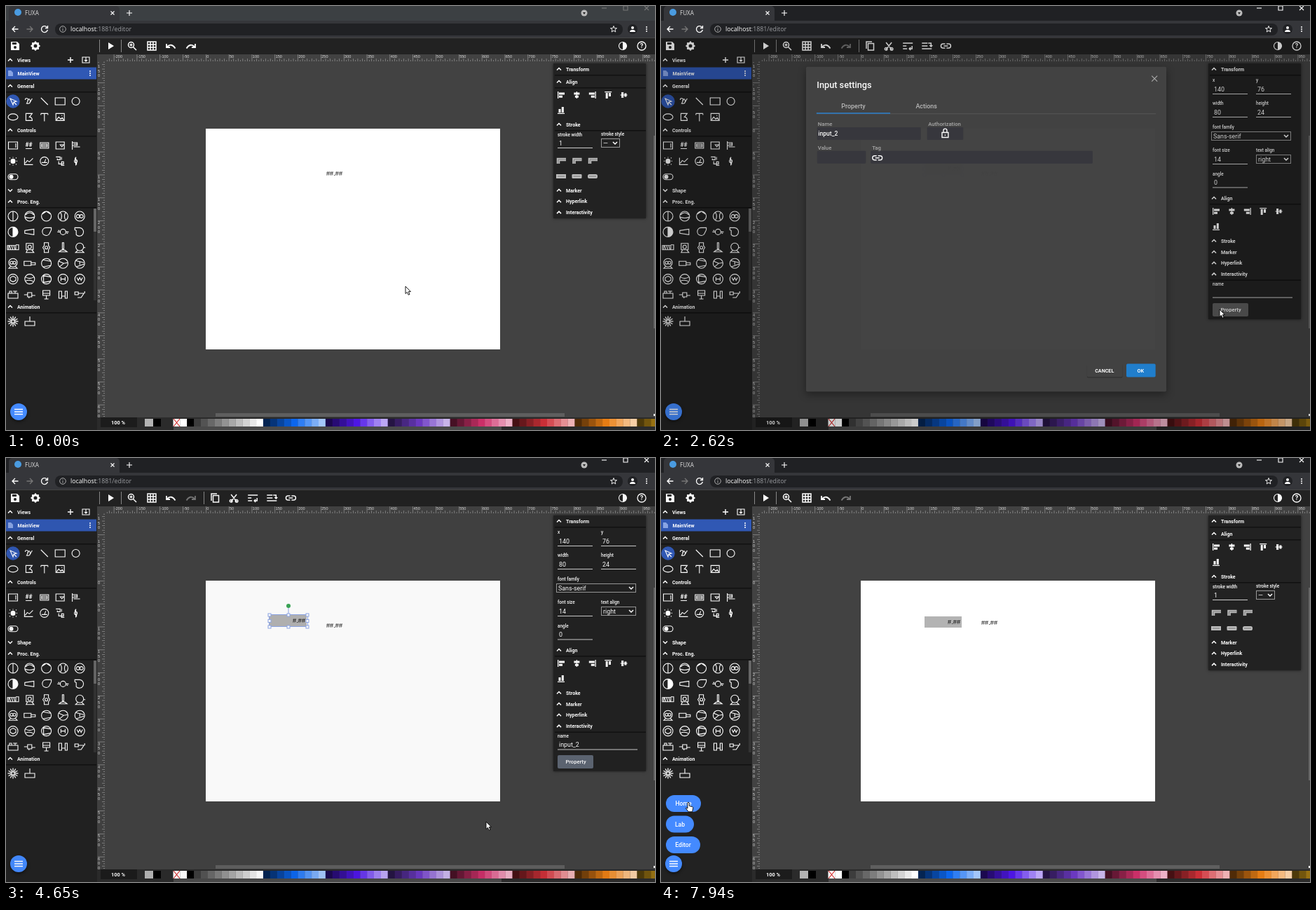
These frames come from a looping animation (926x605 px, 8000 ms). An HTML page with a canvas:

```html
<!DOCTYPE html>
<html lang="en">
<head>
<meta charset="utf-8">
<title>Editor</title>
<style>
  html, body { margin: 0; height: 100%; overflow: hidden; background: #424242; }
  canvas { display: block; }
</style>
</head>
<body>
<canvas id="stage" width="926" height="605"></canvas>
<script>
const ctx = document.getElementById('stage').getContext('2d');
const LOOP = 8000, UNIT = 0.6563, PAGE = { x: 285, y: 175, w: 420, h: 315 };
const BLUE = '#448aff', ROW_BLUE = '#3058b4', DARK = '#222', GRAY = '#777';

const clamp = v => Math.max(0, Math.min(1, v));
const smooth = v => v * v * (3 - 2 * v);
const easeOut = v => 1 - (1 - clamp(v)) ** 3;
const circle = (r, x = 0, y = 0) => `M${x - r} ${y}a${r} ${r} 0 1 0 ${2 * r} 0a${r} ${r} 0 1 0 ${-2 * r} 0`;

function rect(x, y, w, h, fill, r = 0) {
  ctx.fillStyle = fill;
  ctx.beginPath();
  ctx.roundRect(x, y, w, h, r);
  ctx.fill();
}
function frame(x, y, w, h, color) {
  ctx.strokeStyle = color;
  ctx.lineWidth = 1;
  ctx.strokeRect(x + .5, y + .5, w - 1, h - 1);
}
function text(s, x, y, size = 7.05, { color = '#fff', weight = 400, align = 'left', font = 'Roboto' } = {}) {
  ctx.font = `${weight} ${size}px "${font}", sans-serif`;
  ctx.fillStyle = color;
  ctx.textAlign = align;
  ctx.fillText(s, x, y + size * .36);
}
function icon(d, x, y, { color = '#fff', fill, width = 1.1 } = {}) {
  const path = new Path2D(d);
  ctx.save();
  ctx.translate(x, y);
  if (fill) { ctx.fillStyle = fill; ctx.fill(path); }
  if (width) { ctx.strokeStyle = color; ctx.lineWidth = width; ctx.stroke(path); }
  ctx.restore();
}
const solid = (d, x, y, color = '#fff') => icon(d, x, y, { fill: color, width: 0 });
const dots = (x, y, gap = 3) => [-gap, 0, gap].forEach(d => solid(circle(1), x, y + d));

const SHAPES = {
  cut: 'M-4-5L4 5M4-5L-4 5' + circle(1.8, -4, 4.2) + circle(1.8, 4, 4.2),
  copy: 'M-5 4V-6H3M-2.5-3.5H5.5V6H-2.5Z',
  link: 'M-1-3H-4a3 3 0 0 0 0 6H-1M1-3H4a3 3 0 0 1 0 6H1M-3 0H3',
  undo: 'M-6-3V2H-1M-5.5 1.5Q1-5 6.5 3.5',
  redo: 'M6-3V2H1M5.5 1.5Q-1-5-6.5 3.5',
  grid: 'M-6-6H6V6H-6ZM-2-6V6M2-6V6M-6-2H6M-6 2H6',
  x: 'M-4-4L4 4M4-4L-4 4',
  plus: 'M-4 0H4M0-4V4',
  arrow: 'M0 0V10.5L2.4 8.3L4.2 12.2L6 11.4L4.3 7.6H7.4Z',
  hand: 'M-1.2 1.2q1.2-2 2.4 0v4.2l4.5 1.2q1.4.6 1 2.2l-1 5h-5.6l-3.8-5.2q.6-1.2 2.7.4z',
};
const ALIGN = ['M-5-5h1.3V5h-1.3ZM-3-3.5H5v3H-3ZM-3 .8H2v3H-3Z', 'M-.6-5H.6V5H-.6ZM-4-3.5H4v3H-4ZM-2.5.8h5v3h-5Z',
  'M3.7-5H5V5H3.7ZM-5-3.5H3v3H-5ZM-2 .8H3v3H-2Z', 'M-5-5H5v1.3H-5ZM-3.5-3h3v8h-3ZM.8-3h3v5h-3Z',
  'M-5-.6H5V.6H-5ZM-3.5-4h3v8h-3ZM.8-2.5h3v5h-3Z', 'M-5 3.7H5V5H-5ZM-3.5-2h3v5h-3ZM.8-5h3v8h-3Z'];
const TEXT_ALIGN = ['M-6-5H6M-6-2H2M-6 1H6M-6 4H2', 'M-6-5H6M-4-2H4M-6 1H6M-4 4H4', 'M-6-5H6M-2-2H6M-6 1H6M-2 4H6',
  'M-5-5H5M0 6V-3M-3 0L0-3L3 0', 'M-6 0H6M0-6V-2M-2-4L0-2L2-4M0 6V2M-2 4L0 2L2 4', 'M-5 5H5M0-6V3M-3 0L0 3L3 0'];
const GENERAL = ['M-4-4L0 5L1 1L5 0ZM1 1L5 5', 'M-5-2Q-5-5-2-4T-3 3Q3 4 2-1T-2 0M1 3L5-4',
  'M-5-5L5 5', 'M-7-5H7V5H-7Z', circle(5.5), 'M-7 0a7 4.5 0 1 0 14 0a7 4.5 0 1 0-14 0',
  'M-4-5H5L1 0Q5 0 5 5H-4Z', 'M-5-5H5M0-5V6M-5-5V-3M5-5V-3', 'M-6-5H6V5H-6ZM-5 4L-2 0L1 3L3 1L5 4M2-2h1'];
const CONTROLS = ['M-6.5-5H6.5V5H-6.5ZM4-3V3', '', 'M-6-4H6V4H-6ZM-4-2H4V2H-4ZM-4 0H4',
  'M-6-5H6V5H-6ZM0-1L2.5 2L5-1Z', 'M-5-6V6M-5-4H2V0H-5M-3 2H6M-3-2H2', circle(3) + 'M0-5V-6M0 5V6M-5 0H-6M5 0H6M-4-4l-1-1M4-4l1-1M-4 4l-1 1M4 4l1 1',
  'M-6-5V5H6M-5 3L-2-1L1 1L6-4', circle(6) + 'M-4 2H4M0 2L2-3', 'M-6-6H0V-2H-4V-4M-2 0V4H5V1H2V6H6M2-6V-2',
  'M0-6V6' + circle(2) + 'M-1-5V-2M1 2V5', 'M-3-4H3a4 4 0 0 1 0 8H-3a4 4 0 0 1 0-8'];
const RING = circle(7);
const PROCESS = [
  RING + 'M0-7V7', RING + 'M-6-2Q0-8 6-2M-7 1Q0 4 7 1', RING + 'M-6-3L0-7L6-3', RING + 'M-4-6Q0 0-4 6M4-6Q0 0 4 6', RING + circle(2.4, -2.5) + circle(2.4, 2.5),
  RING + 'M0-7V7', 'M-7-2L6-4V4L-7 2Z', 'M7-6H0A5.5 5.5 0 1 0 5 1L7-3Z', circle(4) + 'M-8 0H-4M4 0H8M-5-2H-7M5 2H7', 'M-7-6H0A6 6 0 1 1-5 4L-5-2L-7-3Z',
  'M-8-3H4V3H-8ZM-6 3V-3M-3 3L-5-3M0 3L-2-3M3 3L1-3M4-4H8V3H4', 'M-5-6H5V3H-5ZM-3 3L-5 7H6L3 3' + circle(2.5, 0, -1), 'M-3-7H3V-3L5 0L3 3V7H-3V3L-5 0L-3-3Z' + circle(2), 'M-1-7H1V2H-1ZM-6 6Q0 0 6 6Z', circle(5.5, 0, -1) + 'M-3 4L-6 7H6L3 4M5 0H8',
  circle(6, 0, -1) + circle(2, -2, -1) + circle(2, 2, -1) + 'M-3 4L-6 7H6L3 4', 'M-8-3H2V3H-8ZM2-1H8V2H2', RING + 'M-5-5L6-3M-5 5L6 3', RING + 'M-6-3L1 0L7-1M1 0L-5 5', RING + 'M-6-4L6-1M6 1L-5 5M0-2V2',
  RING + 'M0-4L4-2V2L0 4L-4 2V-2Z', RING + 'M-6-3Q0 1 6-3M-6 3Q0 0 6 4', RING + 'M-4-5V5M-5-5L6-3M-5 5L6 3', RING + 'M-3-3V3M3-3V3M-3 0H3', RING + 'M-4-2L-2 2L0-2L2 2L4-2',
  'M-7-2H7V5H-7ZM-5-2V-5H-2V-2M0-5H6M3-5V-2', 'M-8 0H-3M-3-3H3V3H-3ZM3 1H8M-1 3V5', 'M-5-6H5V1H-5ZM-5-2H5M0 1V6M-3 6H3', 'M-6-5V5H-2V-5ZM3-5V5H6V-5ZM-2 2H3', 'M-7-4H-2V0H-7ZM-2-2H6L2 4H-3M7-5V-2'];

function chevron(x, y, up, color) {
  icon(up ? 'M-3 1.5L0-1.5L3 1.5' : 'M-3-1.5L0 1.5L3-1.5', x, y, { color, width: 1.5 });
}
function header(label, x, y, w, open = true, line = true) {
  chevron(x, y, open);
  text(label, x + 10, y, 7.05, { weight: 700 });
  if (line) rect(x - 6, y + 8, w, 1.5, '#111');
}

function drawBrowser(focused) {
  const faint = focused ? '#fff' : '#777';
  rect(0, 0, 926, 24, focused ? '#202124' : '#3c4043');
  rect(4, 0, 158, 26, '#35363a', 5);
  rect(0, 21, 926, 24, '#35363a');
  rect(70, 25, 810, 17, '#202124', 8);
  solid(circle(5), 17, 9, '#4a9be0');
  text('FUXA', 27, 10, 8.1, { color: '#ddd', font: 'Open Sans' });
  icon('M-2.5-2.5L2.5 2.5M2.5-2.5L-2.5 2.5', 152, 10);
  icon(SHAPES.plus, 176, 10);
  solid(circle(4.5), 825, 10, '#bbb');
  solid('M-2-1H2L0 2Z', 825, 10, '#222');
  icon('M-3 0H4', 853, 3, { color: faint });
  icon('M-3-3H3V3H-3Z', 884, 3, { color: faint });
  icon('M-3-3L3 3M3-3L-3 3', 914, 3, { color: faint });
  icon('M4.5 0H-4M0-4L-4 0L0 4', 13, 33, { width: 1.3 });
  icon('M-4.5 0H4M0-4L4 0L0 4', 34, 33, { color: GRAY, width: 1.3 });
  icon('M4-2A4.5 4.5 0 1 0 4.4 1M4.5-5V-1.5H1', 55, 33, { width: 1.3 });
  icon(circle(4.3) + 'M0-.5V2.5M0-2.5V-1.5', 81, 33, { color: '#bbb', width: .9 });
  text('localhost', 92, 33, 8.8, { font: 'Open Sans' });
  const w = ctx.measureText('localhost').width;
  text(':1881/editor', 92 + w, 33, 8.8, { font: 'Open Sans', color: '#9a9ca0' });
  icon('M0-4.5L1.2-1.3H4.5L2 .8L2.8 4L0 2.2L-2.8 4L-2 .8L-4.5-1.3H-1.2Z', 867, 33, { width: .9 });
  solid(circle(7), 894, 33, '#202124');
  solid(circle(2, 0, -2) + 'M-4 4Q-4 1 0 1T4 4Z', 894, 33);
  dots(914, 33);
}

function drawToolbar(mode, redoOn) {
  rect(0, 45, 926, 24, DARK);
  rect(0, 45, 926, 1, '#444');
  solid('M-6-6H3L6-3V6H-6Z', 13, 57);
  rect(9, 52, 6, 3, DARK);
  solid(circle(2), 13, 59, DARK);
  icon(circle(4), 42, 57, { width: 3 });
  for (let i = 0; i < 8; i++) {
    const a = i * Math.PI / 4;
    solid(circle(1.2), 42 + 5.5 * Math.cos(a), 57 + 5.5 * Math.sin(a));
  }
  rect(133, 48, 1, 18, '#888');
  rect(164, 48, 1, 18, '#888');
  solid('M-4-5L4 0L-4 5Z', 150, 57);
  icon(circle(4, -1.5, -1.5) + 'M1.5 1.5L6 6M-3.5-1.5H.5M-1.5-3.5V.5', 180, 57, { width: 1.5 });
  icon(SHAPES.grid, 208, 57, { width: 1.5 });
  icon(SHAPES.undo, 235, 57, { width: 1.8 });
  icon(SHAPES.redo, 264, 57, { width: 1.8, color: redoOn ? '#fff' : GRAY });
  if (mode !== 'none') {
    const tools = [SHAPES.copy, SHAPES.cut].concat(mode === 'single'
      ? ['M-7-4H7M-7 0H-2M-7 4H-1M6 0V4H2M4 2L2 4L4 6', 'M-7-4H1M-7 0H1M-7 4H7M2-4H6V1M4-1L6 1L8-1', SHAPES.link]
      : ['M-7-6H7V6H-7ZM-4-3H2V1H-4ZM-1-1H4V3H-1Z', ...TEXT_ALIGN]);
    rect(282, 48, 1, 18, '#888');
    tools.forEach((d, i) => icon(d, 298 + i * 27.1, 57, { width: 1.5 }));
  }
  icon(circle(5.5), 880, 57);
  solid('M0-5.5A5.5 5.5 0 0 1 0 5.5Z', 880, 57);
  icon(circle(6), 907, 57, { width: 1.3 });
  text('?', 907, 57, 9, { align: 'center', weight: 700 });
}

function drawRulers() {
  ctx.save();
  ctx.beginPath();
  ctx.rect(130, 69, 796, 518);
  ctx.clip();
  const label = { color: '#ddd', font: 'Liberation Sans' };
  for (let v = -220; v < 980; v += 5) {
    const x = PAGE.x + v * UNIT, y = PAGE.y + v * UNIT, major = v % 50 === 0;
    const len = major ? 10 : v % 10 ? 2 : 4;
    if (x > 141) rect(x, 79 - len, .7, len, '#999');
    if (y > 79) rect(141 - len, y, len, .7, '#999');
    if (!major) continue;
    if (x > 141) text(String(v), x + 1.2, 72.5, 5.5, label);
    [...String(v)].forEach((c, i) => y + i * 6.5 > 76 && text(c, 131, y + 3 + i * 6.5, 5.5, label));
  }
  ctx.restore();
}

function drawSidebar(tool) {
  rect(0, 69, 130, 536, DARK);
  header('Views', 6, 77, 129, true, false);
  icon(SHAPES.plus, 92, 77, { width: 1.4 });
  icon('M-5-4H5V4H-5ZM0-4V2M-2 0L0 2L2 0', 114, 77);
  rect(0, 87.5, 129, 17, ROW_BLUE);
  solid('M-3-4H1L4-1V4H-3Z', 6, 96, '#88a4e4');
  text('MainView', 16.5, 96.5, 7.05, { weight: 700 });
  dots(120, 96);
  header('General', 6, 114, 129);
  header('Controls', 6, 177, 129);
  header('Shape', 6, 263, 129, false, false);
  header('Proc. Eng.', 6, 279, 129);
  header('Animation', 6, 429, 129);
  solid(circle(9.7), 10, tool === 'input' ? 199 : 136, ROW_BLUE);
  const place = (list, y, dx) => list.forEach((d, i) => icon(d, 10 + i % 5 * dx, y + Math.floor(i / 5) * 22.4));
  place(GENERAL, 136, 22.4);
  place(CONTROLS, 199, 22.4);
  text('##', 32.5, 198, 8.5, { weight: 700, align: 'center' });
  rect(28, 203, 9, 1, '#fff');
  solid(circle(3), 10, 221.4);
  solid(circle(3), 7.5, 243.8);
  place(PROCESS, 300, 23.8);
  solid('M0-7A7 7 0 0 1 0 7Z', 10, 322.4);
  rect(125, 289, 4, 131, '#333');
  rect(125, 289, 4, 33, '#666');
  for (let i = 0; i < 12; i++) {
    const a = i * Math.PI / 6, c = Math.cos(a), s = Math.sin(a);
    icon(`M${1.5 * c} ${1.5 * s}L${7.5 * c} ${7.5 * s}`, 10, 450, { width: 1.3 });
  }
  icon('M-7 0H7V6H-7ZM0 0V-7', 34, 450);
}

function drawBottom() {
  rect(299, 581, 498, 5, '#5f5f5f');
  rect(924, 185, 2, 275, '#666');
  rect(924, 582, 2, 3, '#fff');
  rect(130, 587, 796, 18, '#2b2b2b');
  rect(135, 587, 52, 14, '#1c1c1c');
  text('100 %', 150, 594, 7.4, { weight: 700 });
  rect(198, 589, 12, 11, '#b3b3b3');
  rect(210, 589, 11, 11, '#000');
  const ramps = [[216, 90], [256, 82], [262, 54], [338, 62], [357, 62], [30, 84], [43, 80]];
  for (let i = 0; i < 70; i++) {
    const group = Math.floor((i - 13) / 9), step = (i - 13) % 9;
    const color = i < 2 ? '#fff' : i === 2 ? '#000'
      : i < 13 ? `hsl(0 0% ${24 + (i - 3) * 8.4}%)`
      : `hsl(${ramps[group][0]} ${ramps[group][1]}% ${17 + step * 8}%)`;
    rect(238.5 + i * 9.88, 589, 10, 11, color);
  }
  icon('M-4.5-5.5L4.5 5.5M4.5-5.5L-4.5 5.5', 243.5, 594.5, { color: '#d02020' });
  rect(239, 600, 468, 5, '#4a4a4a');
}

const caption = (s, x, y) => text(s, x, y, 6.4, { weight: 500 });
function field(label, value, x, y, w = 50) {
  caption(label, x, y);
  text(value, x + 2, y + 12.5, 8.9);
  rect(x, y + 19, w, 1, '#ccc');
}
function select(value, x, y, w) {
  frame(x, y, w, 13, '#999');
  text(value, x + 3, y + 6.5, 8.9);
  chevron(x + w - 7, y + 6.5, false);
}

function drawPanel(mode, name) {
  const single = mode === 'single', bottom = { none: 303, single: 447, multi: 225 }[mode];
  const row = (label, y, line) => header(label, 789, y, 130, true, line);
  ctx.save();
  ctx.shadowColor = 'rgba(0,0,0,.6)';
  ctx.shadowBlur = 4;
  rect(781, 82, 132, bottom - 82, DARK);
  ctx.restore();
  row('Transform', 90, true);
  if (single) {
    field('x', '140', 787, 106);
    field('y', '76', 849, 106);
    field('width', '80', 787, 139);
    field('height', '24', 849, 139);
    caption('font family', 787, 172.5);
    select('Sans-serif', 785, 179, 114);
    field('font size', '14', 787, 206);
    caption('text align', 849, 206);
    select('right', 849, 212, 50);
    field('angle', '0', 787, 239.5);
  }
  const y = single ? 274 : 108;
  row('Align', y, true);
  ALIGN.forEach((d, i) => solid(d, 792 + i % 5 * 22.4, y + 19 + Math.floor(i / 5) * 22));
  row('Stroke', y + 61, mode === 'none');
  if (mode === 'none') {
    caption('stroke width', 787, 183.5);
    text('1', 789, 196, 8.9);
    rect(787, 202, 50, 1, '#ccc');
    caption('stroke style', 849, 183);
    select('—', 849, 189, 27);
    for (let i = 0; i < 3; i++) {
      const x = 792 + i * 22.5;
      icon('M7-2H-4V4', x, 221, { color: '#bbb', width: 4.5 });
      icon('M7-2H-4V4', x, 221, { color: '#777', width: 1 });
      rect(x - 7, 240, 14, 6, '#bbb', i * 1.3);
      rect(x - 5, 242.5, 10, 1, '#777');
    }
  }
  const next = mode === 'none' ? 263 : y + 77;
  row('Marker', next, false);
  row('Hyperlink', next + 15.8, false);
  row('Interactivity', next + 31.6, single);
  if (single) {
    field('name', name, 787, 396.5, 114);
    rect(787, 424, 51, 19, name ? '#5d6573' : '#5b5b5b', 2);
    text('Property', 813, 433.5, 7.6, { weight: 500, align: 'center' });
  }
}

function drawPage(s) {
  rect(PAGE.x, PAGE.y, PAGE.w, PAGE.h, '#fff');
  const black = { color: '#000', font: 'Liberation Sans' }, edge = '#8fa8e8';
  const inputY = s.aligned ? 226 : 224, labelY = s.aligned ? 234.5 : 238.5;
  if (s.hasInput) {
    rect(376, inputY, 53, 16, '#b3b3b3');
    text('#.##', 427, inputY + 8, 9.2, { ...black, align: 'right' });
  }
  text('##.##', 457, labelY, 9.2, black);
  if (s.mode !== 'none') frame(375, inputY - 1, 56, 18, edge);
  if (s.mode === 'multi') frame(455, labelY - 6.5, 27, 13, edge);
  if (s.mode === 'single') {
    rect(402.5, 213, 1, 10, edge);
    solid(circle(3), 403, 211, '#3aa655');
    for (let i = 0; i < 9; i++) {
      if (i === 4) continue;
      const x = 376 + i % 3 * 27, y = 224 + Math.floor(i / 3) * 8.5;
      rect(x - 2, y - 2, 4, 4, '#fff');
      frame(x - 2.5, y - 2.5, 5, 5, edge);
    }
  }
  if (s.marquee) {
    const { x, y } = s.pointer;
    rect(x, y, 524 - x, 280 - y, 'rgba(80,120,255,.12)');
    frame(x, y, 524 - x, 280 - y, edge);
  }
}

function drawDialog(t) {
  const shown = easeOut((t - 2515) / 150), scale = .7 + .3 * shown;
  const label = { color: '#aaa', weight: 500 };
  // the surface starts lighter and settles with the backdrop
  const light = 26.5 - 4.2 * easeOut((t - 2620) / 300);
  const surface = `hsl(0 0% ${light}%)`, box = `hsl(240 5% ${light - 3.6}%)`;
  ctx.save();
  ctx.globalAlpha = shown * clamp((4640 - t) / 40);
  ctx.translate(464, 318.5);
  ctx.scale(scale, scale);
  ctx.translate(-464, -318.5);
  ctx.save();
  ctx.shadowColor = 'rgba(0,0,0,.4)';
  ctx.shadowBlur = 12;
  ctx.shadowOffsetY = 4;
  rect(205, 85, 518, 467, surface, 2);
  ctx.restore();
  text('Input settings', 220.5, 111, 12.8, { weight: 500 });
  icon(SHAPES.x, 706, 102, { color: '#aaa', width: 1.2 });
  text('Property', 273, 141, 9, { color: '#bbb', align: 'center', weight: 500 });
  text('Actions', 378, 141, 9, { color: '#bbb', align: 'center', weight: 500 });
  rect(220, 152, 488, 1, '#555');
  rect(220, 151, 106, 1.5, '#2a82d0');
  text('Name', 222, 167, 7.8, label);
  text('Authorization', 380.5, 167, 7.8, label);
  text('Value', 222, 201, 7.8, label);
  text('Tag', 300, 201, 7.8, label);
  rect(221, 172, 149, 18, box, 1);
  rect(379, 172, 52, 18, box, 1);
  rect(221, 206, 70, 18, box, 1);
  rect(298, 206, 319, 18, box, 1);
  text('input_2', 222.5, 181, 8.6, { weight: 500 });
  icon('M-4.5-1H4.5V6H-4.5ZM-2.5-1V-4a2.5 2.5 0 0 1 5 0V-1M0 2V3.5', 405, 180.5, { width: 1.4 });
  icon(SHAPES.link, 307.5, 216, { width: 1.4 });
  rect(609, 513, 51, 19, '#2c2c2c', 2);
  rect(609, 512, 51, 19, surface, 2);
  text('CANCEL', 634, 521.5, 7.2, { weight: 700, align: 'center' });
  rect(665.5, 512, 42, 19, '#1f7fcf', 2);
  text('OK', 686, 521.5, 7.2, { weight: 700, align: 'center' });
  ctx.restore();
}

function drawMenu(open) {
  if (open) {
    [['Home', 50, 481], ['Lab', 40, 510.5], ['Editor', 49, 540]].forEach(([s, w, y]) => {
      rect(7, y, w, 24, BLUE, 12);
      text(s, 7 + w / 2, y + 12, 8.6, { align: 'center', weight: 500 });
    });
  }
  ctx.save();
  ctx.shadowColor = 'rgba(0,0,0,.5)';
  ctx.shadowBlur = 4;
  ctx.shadowOffsetY = 2;
  solid(circle(12), 18, 579, BLUE);
  ctx.restore();
  icon('M-6-3.5H6M-6 0H6M-6 3.5H6', 18, 579, { width: 1.4 });
}

// time, x, y of the pointer
const TRACK = [
  [80, 570, 400], [430, 8, 195], [540, 8, 195], [870, 262, 300], [1500, 376, 240], [1830, 376, 240],
  [2450, 797, 433], [2680, 797, 433], [3400, 770, 300], [3700, 722, 150], [4020, 743, 179],
  [4270, 685, 489], [4440, 685, 519], [4660, 685, 519], [4900, 524, 280], [5320, 314, 203],
  [5620, 239, 71], [5760, 184, 58], [6220, 470, 62], [6300, 488, 58], [6680, 488, 58],
  [6940, 505, 278], [7200, 505, 278], [7540, 18, 577], [7660, 18, 577], [7880, 38, 503], [7940, 39, 491],
];
function pointerAt(t) {
  const i = TRACK.findIndex(k => k[0] > t);
  if (i < 1) { const [, x, y] = TRACK.at(i); return { x, y }; }
  const [t0, x0, y0] = TRACK[i - 1], [t1, x1, y1] = TRACK[i];
  const p = smooth((t - t0) / (t1 - t0));
  return { x: x0 + (x1 - x0) * p, y: y0 + (y1 - y0) * p };
}
const between = (t, a, b) => t >= a && t < b;

function stateAt(t) {
  return {
    pointer: pointerAt(t),
    hand: between(t, 3600, 4600) || t >= 7500,
    focused: t >= 450,
    tool: between(t, 450, 1850) ? 'input' : 'select',
    hasInput: t >= 1500,
    mode: between(t, 1850, 4900) ? 'single' : between(t, 5320, 7200) ? 'multi' : 'none',
    marquee: between(t, 4900, 5320),
    aligned: t >= 6400,
    name: t >= 4600 ? 'input_2' : '',
    menuOpen: t >= 7600,
    dialog: between(t, 2615, 4640),
    shade: between(t, 2615, 4610) ? .32 * easeOut((t - 2510) / 400)
      : t >= 4610 ? .03 * clamp(1 - (t - 4610) / 150) : 0,
  };
}

function draw(t) {
  const s = stateAt(t);
  rect(0, 0, 926, 605, '#424242');
  drawPage(s);
  drawRulers();
  drawBottom();
  drawSidebar(s.tool);
  drawToolbar(s.mode, t < 1850);
  drawPanel(s.mode, s.name);
  drawMenu(s.menuOpen);
  drawBrowser(s.focused);
  if (s.shade) rect(0, 45, 926, 560, `rgba(0,0,0,${s.shade})`);
  if (s.dialog) drawDialog(t);
  icon(s.hand ? SHAPES.hand : SHAPES.arrow, s.pointer.x, s.pointer.y, { color: '#000', fill: '#fff', width: .9 });
}

const start = performance.now();
(function tick() {
  draw((performance.now() - start) % LOOP);
  requestAnimationFrame(tick);
})();
</script>
</body>
</html>
```
